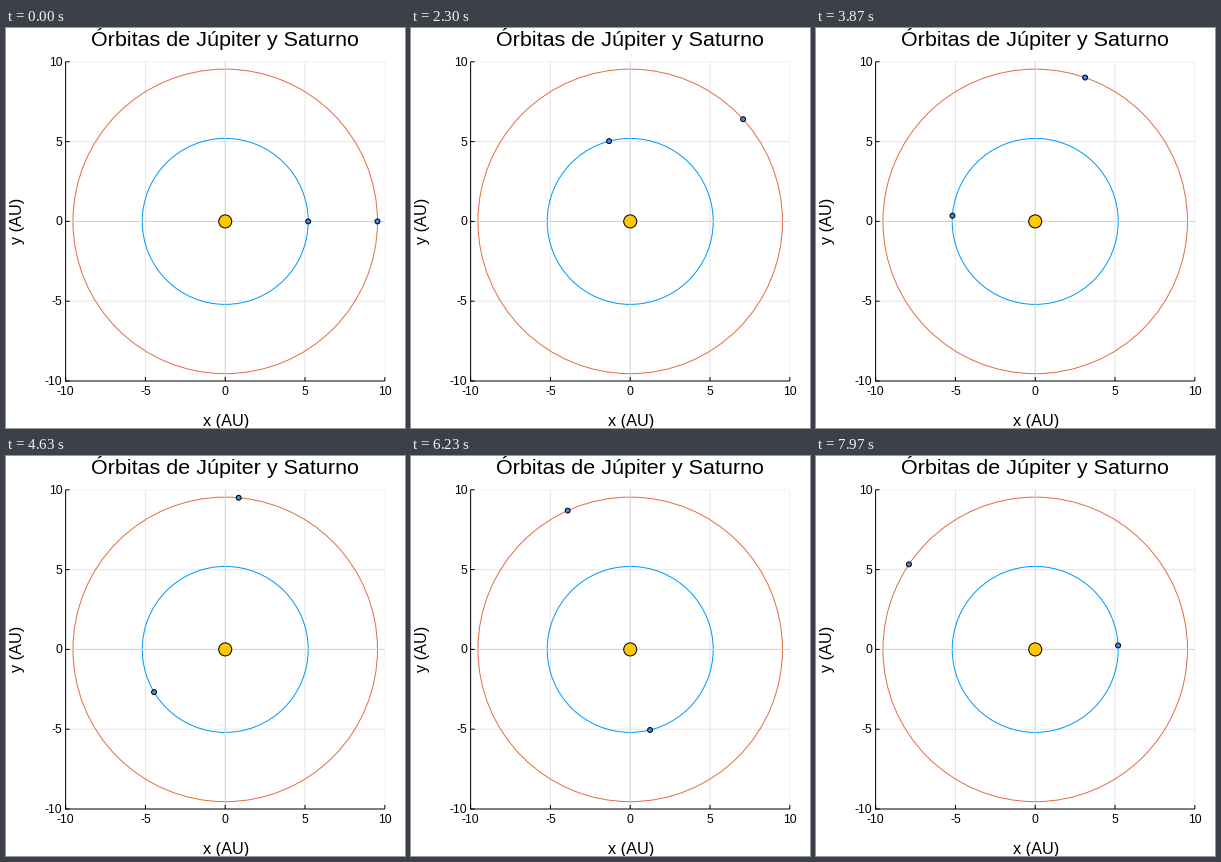
Recreate the animation shown at these times as a matplotlib script. Size 399 px wide and 400 px high, loop 8000 ms.

```python
import math
import matplotlib.pyplot as plt
from matplotlib.animation import FuncAnimation

W, H, DPI = 399, 400, 100
TICK, LOOP = 20, 8000             # drawing interval and loop in ms
STEP = 100 / 3                    # time between planet moves in ms
YEARS = 0.05                      # simulated time per move
CX, CY, AU = 219.22, 193.4, 15.96  # sun position and scale in pixels
HALF = 10 * AU
PX = 72 / DPI                     # one pixel in points

plt.rcParams["font.family"] = "Liberation Sans"
fig = plt.figure(figsize=(W / DPI, H / DPI), dpi=DPI, facecolor="white")
ax = fig.add_axes([0, 0, 1, 1])
ax.set_xlim(0, W)
ax.set_ylim(H, 0)
ax.axis("off")


def to_px(x, y):
    return CX + x * AU, CY - y * AU


def line(p, q, color, z):
    (x0, y0), (x1, y1) = p, q
    ax.plot([x0, x1], [y0, y1], color=color, lw=PX, zorder=z,
            solid_capstyle="butt", snap=False)


def label(x, y, s, size, **kw):
    ax.text(x, y, s, fontsize=size * PX, color="black", **kw)


def disc(x, y, r, face, z, edge="black"):
    c = plt.Circle((x, y), r, fc=face, ec=edge, lw=PX, zorder=z)
    return ax.add_patch(c)


# Grid, ticks and axes
LEFT, TOP = to_px(-10, 10)
RIGHT, BOTTOM = to_px(10, -10)
GRID = {-5: ("#e6e6e6", 1), 0: ("#d0d0d0", 3), 5: ("#e6e6e6", 1),
        10: ("#f2f2f2", 1)}
for v in (-10, -5, 0, 5, 10):
    x, y = to_px(v, v)
    if v in GRID:
        line((x, TOP), (x, BOTTOM), *GRID[v])
        line((LEFT, y), (RIGHT, y), *GRID[v])
    line((x, BOTTOM), (x, BOTTOM - 4), "black", 4)
    line((LEFT, y), (LEFT + 4, y), "black", 4)
    label(x, 367, str(v), 12.1, ha="center")
    label(56.5, y + 4, str(v), 12.1, ha="right")

line((LEFT, TOP), (LEFT, BOTTOM + 0.5), "black", 4)
line((LEFT - 0.5, BOTTOM), (RIGHT, BOTTOM), "black", 4)

label(219.4, 18, "Órbitas de Júpiter y Saturno", 21.5, ha="center")
label(220, 398, "x (AU)", 16.2, ha="center")
label(18.7, CY - 0.4, "y (AU)", 16.2, ha="right", va="center", rotation=90)

# Orbit radius (AU), period (years), line colour
ORBITS = [(5.2, 11.86, "#009afa"), (9.54, 29.46, "#e26f46")]
planets = []
for radius, _, color in ORBITS:
    disc(CX, CY, radius * AU, "none", 2, color)
    planets.append(disc(*to_px(radius, 0), 2.45, "#4a84e4", 6))
disc(CX, CY, 6.5, "#ffc800", 5)


def update(i):
    years = YEARS * round(i * TICK / STEP)
    for planet, (radius, period, _) in zip(planets, ORBITS):
        a = 2 * math.pi * years / period
        planet.center = to_px(radius * math.cos(a), radius * math.sin(a))
    return planets


anim = FuncAnimation(fig, update, frames=LOOP // TICK, interval=TICK,
                     init_func=lambda: update(0), repeat=True,
                     repeat_delay=0, blit=False)
plt.show()
```
